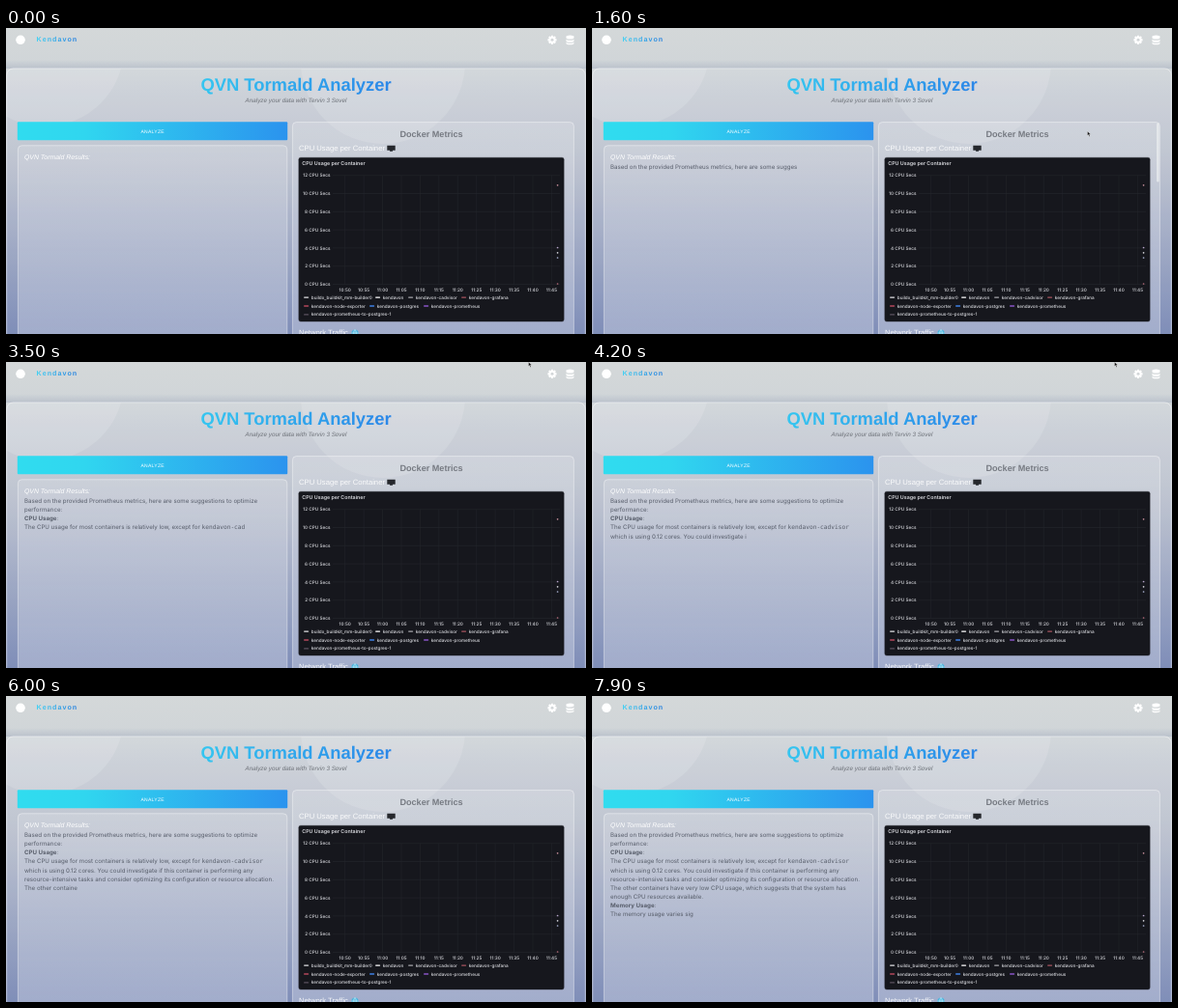
An HTML page that plays this animation: 600x317 px, repeating every 8000 ms.

```html
<!DOCTYPE html>
<html lang="en">
<head>
<meta charset="utf-8">
<title>Analyzer dashboard</title>
<style>
html, body { margin: 0; width: 100%; height: 100%; overflow: hidden; background: #c4c9d2; }
svg { display: block; width: 600px; height: 317px; }
text { white-space: pre; text-rendering: geometricPrecision; font-family: "Liberation Sans", Arial, sans-serif; }
.inter text, text.inter { font-family: Inter, sans-serif; }
.bold { font-weight: 700; }
.code { font-family: "DejaVu Sans Mono", monospace; font-size: 6.2px; }
.mid { text-anchor: middle; }
</style>
</head>
<body>
<svg viewBox="0 0 600 317">
  <defs>
    <linearGradient id="sky" x2="0" y2="1">
      <stop stop-color="#d4d8d9"/><stop offset=".12" stop-color="#d0d5d8"/><stop offset=".2" stop-color="#c9ced6"/>
      <stop offset=".4" stop-color="#bcc2ce"/><stop offset=".5" stop-color="#b2b9ca"/><stop offset="1" stop-color="#7484b2"/>
    </linearGradient>
    <linearGradient id="glass" x2="0" y2="1">
      <stop stop-color="#fff" stop-opacity=".14"/><stop offset="1" stop-color="#fff" stop-opacity=".3"/>
    </linearGradient>
    <linearGradient id="shade" x2="0" y2="1">
      <stop stop-color="#7c8aa8" stop-opacity="0"/><stop offset="1" stop-color="#7c8aa8" stop-opacity=".25"/>
    </linearGradient>
    <linearGradient id="button"><stop stop-color="#30dcef"/><stop offset=".25" stop-color="#30d6ef"/><stop offset="1" stop-color="#2b93ee"/></linearGradient>
    <linearGradient id="heading" gradientUnits="userSpaceOnUse" x1="200" x2="400"><stop stop-color="#35c6f0"/><stop offset="1" stop-color="#2b86e8"/></linearGradient>
    <linearGradient id="brand" gradientUnits="userSpaceOnUse" x1="32" x2="74"><stop stop-color="#45d0f2"/><stop offset="1" stop-color="#2b82de"/></linearGradient>
    <clipPath id="below"><rect y="42" width="600" height="275"/></clipPath>
  </defs>

  <rect width="600" height="317" fill="url(#sky)"/>
  <g clip-path="url(#below)" fill="#fff" opacity=".13">
    <circle cx="40" cy="20" r="82"/>
    <circle cx="390" cy="35" r="85"/>
  </g>

  <!-- header -->
  <circle cx="15" cy="12.3" r="4.8" fill="#fff"/>
  <text x="31.5" y="14.4" class="bold" font-size="7.1" letter-spacing="1.05" fill="url(#brand)">Kendavon</text>
  <g fill="#fff">
    <g id="gear" transform="translate(565 12.3)"></g>
    <path d="M579.5 9a4 1.5 0 0 1 8 0v1a4 1.5 0 0 1-8 0zM579.5 11.3a4 1.5 0 0 0 8 0v2a4 1.5 0 0 1-8 0zM579.5 14.3a4 1.5 0 0 0 8 0v1.4a4 1.5 0 0 1-8 0z"/>
  </g>

  <!-- cards -->
  <rect y="33" width="600" height="9" fill="url(#shade)"/>
  <rect x=".7" y="41.9" width="598.6" height="300" rx="7" fill="#fff" fill-opacity=".08" stroke="#fff" stroke-opacity=".6" stroke-width=".8"/>
  <text x="300" y="65.4" class="bold mid" font-size="18.4" fill="url(#heading)">QVN Tormald Analyzer</text>
  <text x="300" y="77" class="mid" font-size="6.3" font-style="italic" fill="#6d7178">Analyze your data with Tervin 3 Sovel</text>
  <rect x="11.8" y="97.3" width="279.4" height="18.9" rx="1" fill="url(#button)"/>
  <text x="151.7" y="108.7" class="mid" font-size="5" letter-spacing=".3" fill="#fff">ANALYZE</text>
  <g fill="url(#glass)" stroke="#fff" stroke-opacity=".5" stroke-width=".8">
    <rect x="12.4" y="121.8" width="278.4" height="240" rx="4"/>
    <rect x="296.4" y="97.6" width="291" height="260" rx="4"/>
  </g>
  <text x="19" y="135.8" font-size="6.87" font-style="italic" fill="#fff">QVN Tormald Results:</text>
  <text id="result" class="inter" font-size="6.15" fill="#575d6a"></text>

  <!-- metrics -->
  <text x="440" y="113.3" class="bold mid" font-size="9.1" fill="#767a82">Docker Metrics</text>
  <text x="303" y="127.4" font-size="7.66" fill="#fff" fill-opacity=".9">CPU Usage per Container</text>
  <path d="M394.3 121.8h8.4v5h-8.4zM397 126.8h3v1h-3z" fill="#25272c"/>
  <text x="303" y="318.4" font-size="7.66" fill="#fff" fill-opacity=".9">Network Traffic</text>
  <circle cx="361" cy="316" r="3.6" fill="#46b4de"/>
  <path d="M357.5 316h7M361 312.4v7M361 312.4q-3.4 3.6 0 7.2M361 312.4q3.4 3.6 0 7.2" fill="none" stroke="#d9f0f8" stroke-width=".5"/>
  <rect x="302.8" y="134.2" width="274.4" height="169.9" rx="2" fill="#16171d" stroke="#2b2d34" stroke-width=".4"/>
  <g id="chart" class="inter" fill="#dcdde2" font-size="4.7"></g>

  <rect id="scroll" x="584.2" y="98.5" width="2.4" height="61" rx="1.2" fill="#eef0f2" opacity="0"/>
  <path id="pointer" d="M0 0v4.6l1.1-1 .8 1.8 .8-.4-.8-1.7h1.5z" fill="#111" stroke="#fff" stroke-width=".35"/>
</svg>
<script>
const $ = id => document.getElementById(id);
const LOOP = 8000;

function add(parent, tag, attrs, text = '') {
  const el = document.createElementNS('http://www.w3.org/2000/svg', tag);
  for (const key in attrs) el.setAttribute(key, attrs[key]);
  el.textContent = text;
  parent.append(el);
  return el;
}

// Linear interpolation through [time, value] pairs, clamped at both ends
function track(points, t) {
  if (t <= points[0][0]) return points[0][1];
  for (let i = 1; i < points.length; i++) {
    const [t0, v0] = points[i - 1], [t1, v1] = points[i];
    if (t < t1) return v0 + (v1 - v0) * (t - t0) / (t1 - t0);
  }
  return points[points.length - 1][1];
}

function drawGear() {
  const gear = $('gear');
  for (let a = 0; a < 180; a += 45)
    add(gear, 'rect', { x: -1.1, y: -4.6, width: 2.2, height: 9.2, rx: .4, transform: `rotate(${a})` });
  add(gear, 'circle', { r: 3.5 });
  add(gear, 'circle', { r: 1.5, fill: '#d2d6d8' });
}

function drawChart() {
  const chart = $('chart');
  const line = d => add(chart, 'path', { d, stroke: '#26282e', 'stroke-width': .5 });
  add(chart, 'text', { x: 306.3, y: 142.4, 'font-size': 5.3, 'font-weight': 600 }, 'CPU Usage per Container');
  for (let i = 0; i < 7; i++) {
    const y = 152.7 + i * 18.8;
    line(`M338 ${y}H573`);
    add(chart, 'text', { x: 335.5, y: y + 1.6, 'text-anchor': 'end', 'font-weight': 500 }, `${12 - 2 * i} CPU Secs`);
  }
  for (let i = 0; i < 12; i++) {
    const x = 350.7 + i * 19.43, min = 50 + i * 5;
    line(`M${x} 152.7V265.5`);
    add(chart, 'text', { x, y: 273, class: 'mid', 'font-weight': 500 },
      `${10 + Math.floor(min / 60)}:${String(min % 60).padStart(2, '0')}`);
  }
  const dots = [[162.8, '#c08a96'], [227.5, '#b9a6cc'], [232.8, '#d4d4da'], [238, '#a9b0d0'], [265, '#b06a78']];
  for (const [cy, fill] of dots) add(chart, 'circle', { cx: 570.6, cy, r: .85, fill });

  const legend = [
    [308, 0, '#e2e2e5', 'buildx_buildkit_mm-builder0'],
    [382, 0, '#ffffff', 'kendavon'],
    [416, 0, '#a5a5aa', 'kendavon-cadvisor'],
    [471, 0, '#a85560', 'kendavon-grafana'],
    [308, 1, '#b5485c', 'kendavon-node-exporter'],
    [376, 1, '#3f82e6', 'kendavon-postgres'],
    [432, 1, '#8a55c8', 'kendavon-prometheus'],
    [308, 2, '#5c5360', 'kendavon-prometheus-to-postgres-1']
  ];
  for (const [x, row, fill, name] of legend) {
    const y = 279.1 + row * 8.9;
    add(chart, 'rect', { x, y: y - .7, width: 5.2, height: 1.4, rx: .7, fill });
    add(chart, 'text', { x: x + 7.8, y: y + 1.5, 'font-size': 4.65, 'font-weight': 500 }, name);
  }
}

// Each line is a list of [text, class] runs
const lines = [
  [['Based on the provided Prometheus metrics, here are some suggestions to optimize']],
  [['performance:']],
  [['CPU Usage', 'bold'], [':']],
  [['The CPU usage for most containers is relatively low, except for '], ['kendavon-cadvisor', 'code']],
  [['which is using 0.12 cores. You could investigate if this container is performing any']],
  [['resource-intensive tasks and consider optimizing its configuration or resource allocation.']],
  [['The other containers have very low CPU usage, which suggests that the system has']],
  [['enough CPU resources available.']],
  [['Memory Usage', 'bold'], [':']],
  [['The memory usage varies sig']]
];
const runs = lines.flatMap((line, row) => line.map(([text, cls = ''], i) => ({
  text,
  el: add($('result'), 'tspan', { class: cls, ...(i ? {} : { x: 19, y: 146 + row * 9.13 }) })
})));

// Typed characters, resting where markup arrives unseen
const typed = [[800, 0], [1600, 62], [1970, 91], [2200, 91], [2340, 101], [2545, 101], [2800, 121],
  [4200, 232], [5200, 315], [6700, 426], [7240, 468], [7330, 468], [7500, 481], [7554, 481], [7900, 508]];
const pointerX = [[1200, 506], [1600, 512.5], [1800, 515], [2150, 540.5]];
const pointerY = [[1200, 120], [1600, 107], [1800, 92], [2150, 0]];
const scrollAlpha = [[1150, 0], [1250, .75], [2150, .75], [2400, 0]];

function draw(now) {
  const t = Math.floor(now % LOOP / 100) * 100;
  let left = Math.round(track(typed, t));
  for (const { text, el } of runs) {
    const shown = text.slice(0, Math.max(0, left));
    if (el.textContent !== shown) el.textContent = shown;
    left -= text.length;
  }
  $('pointer').setAttribute('transform', `translate(${track(pointerX, t)} ${track(pointerY, t)})`);
  $('pointer').setAttribute('visibility', t >= 1200 && t < 4400 ? 'visible' : 'hidden');
  $('scroll').setAttribute('opacity', track(scrollAlpha, t));
}

drawGear();
drawChart();
const start = performance.now();
(function frame() {
  draw(performance.now() - start);
  requestAnimationFrame(frame);
})();
</script>
</body>
</html>
```
